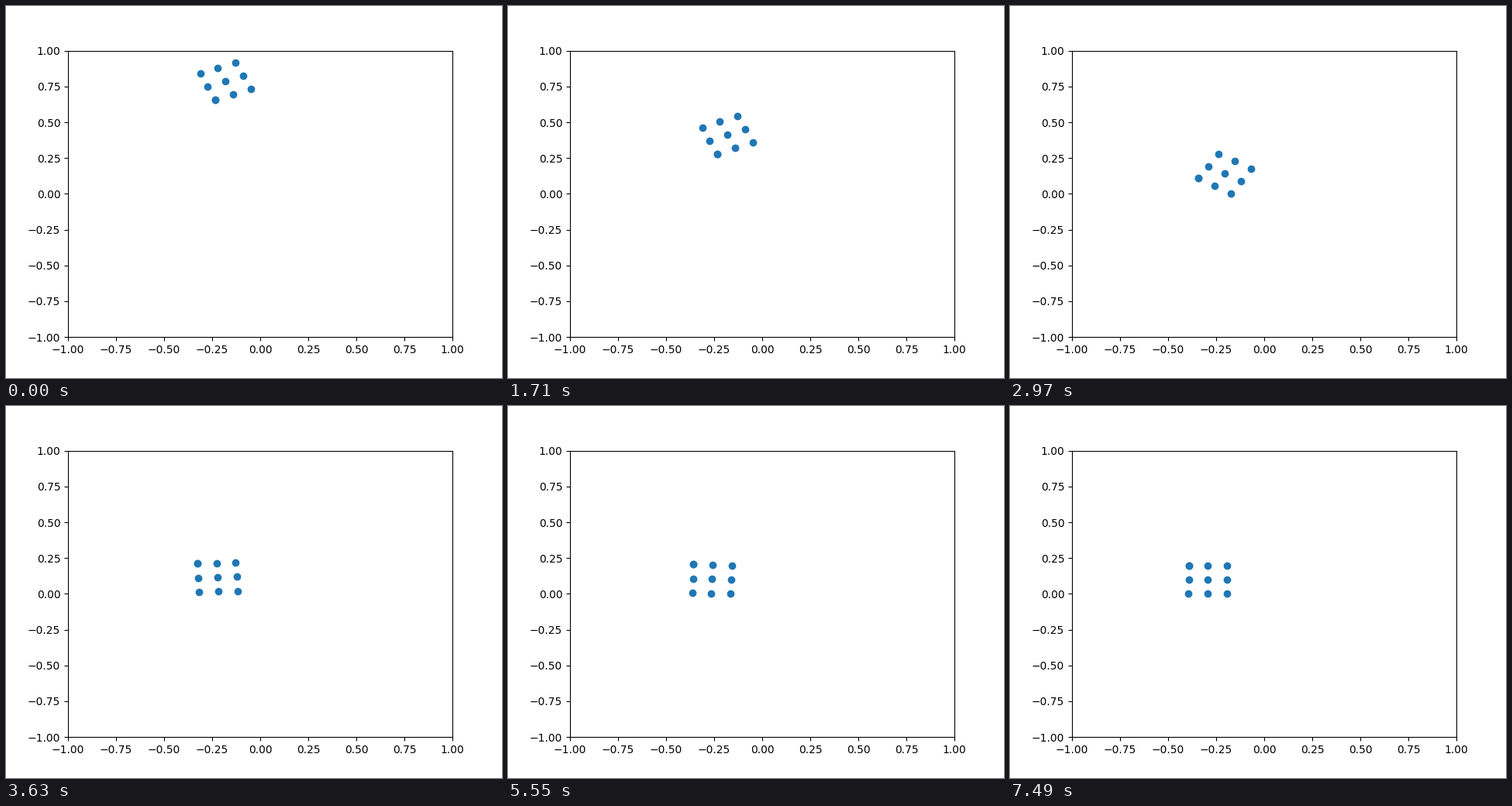
Animation of 640 by 480 pixels, one loop 7520 ms. Source, as a matplotlib script:

```python
import numpy as np
import matplotlib.pyplot as plt
from matplotlib.animation import FuncAnimation

INTERVAL = 20   # ms per drawn frame
FRAMES = 376
STEP = 0.03     # seconds per simulation step

HALF = 0.0998   # half the side of the block
FLOOR = -0.0005
START_X, START_Y, TILT = -0.1810, 0.7868, 22.9
GRAVITY, DRAG, PUSH = 0.2819, 0.25, 0.0117
LAND = 2.33     # seconds until the lowest corner hits the floor
SPIN = 85       # degrees per second after the hit
BOUNCE, HOP = 0.8, 0.015

# 3 x 3 block of particles; the first one is listed twice
side = np.linspace(-HALF, HALF, 3)
BLOCK = np.array([(x, y) for y in side for x in side] + [(-HALF, -HALF)]).T


def turn(angle):
    return np.cos(np.radians(angle)), np.sin(np.radians(angle))


def fall(t):
    """Free fall with air drag."""
    glide = (1 - np.exp(-DRAG * t)) / DRAG
    drop = GRAVITY * (t - glide) / DRAG + PUSH * glide
    return START_X, START_Y - drop, TILT


def tumble(t):
    """Roll over onto the next side, tip a little too far and settle flat."""
    x = START_X - 0.0345 * t**0.72

    peak = 19
    to_flat = TILT + 90
    tip_time = (to_flat + peak) / SPIN
    settle = -peak * np.exp(-1.4 * (t - tip_time))
    angle = max(to_flat - SPIN * t, settle) - 90

    # The lowest corner touches the floor, apart from three soft hops
    c, s = turn(angle)
    y = FLOOR + HALF * (abs(c) + abs(s))
    if t < 3 * BOUNCE:
        y += HOP * np.sin(np.pi * t / BOUNCE)**2
    return x, y, angle


def particles(t):
    x, y, angle = fall(t) if t < LAND else tumble(t - LAND)
    c, s = turn(angle)
    px, py = BLOCK
    return x + px * c - py * s, y + px * s + py * c


fig, ax = plt.subplots(figsize=(6.4, 4.8), dpi=100)
ax.set_xlim(-1, 1)
ax.set_ylim(-1, 1)
dots, = ax.plot(*particles(0), "o", color="C0")


def update(i):
    step = (i * INTERVAL + 10) // 30
    dots.set_data(*particles(step * STEP))
    return dots,


anim = FuncAnimation(fig, update, frames=FRAMES, interval=INTERVAL,
                     repeat=True, repeat_delay=0)
plt.show()
```
